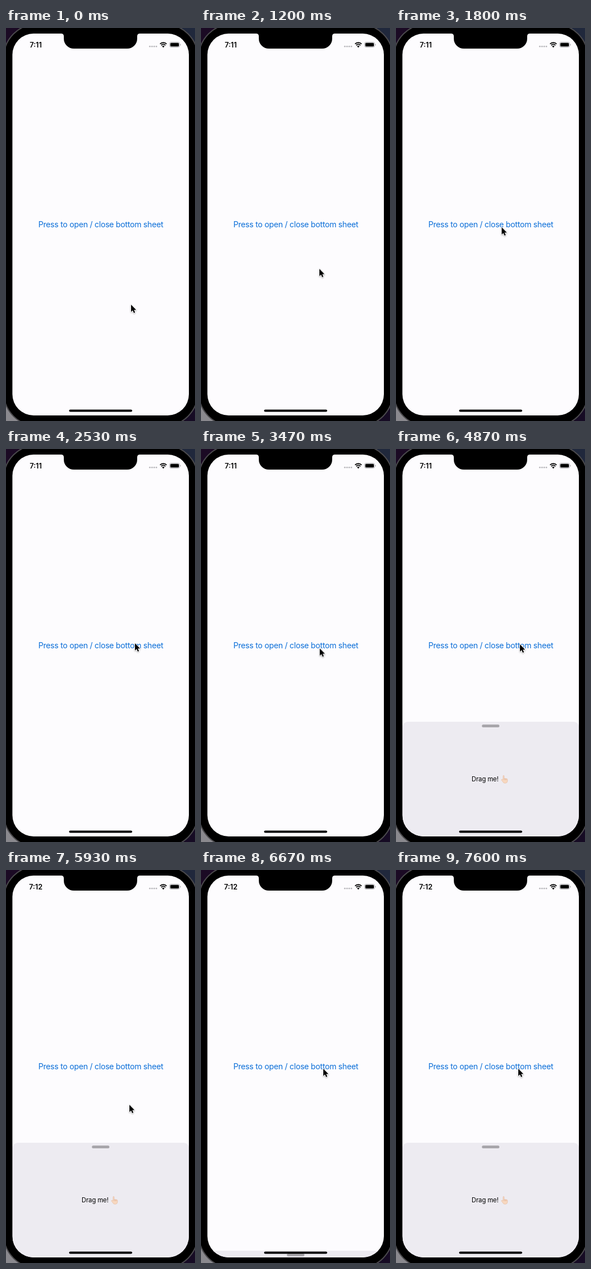
Animation, 340 px wide and 706 px high, one loop 8000 ms. Source, as an HTML page:

```html
<!DOCTYPE html>
<html lang="en">
<head>
<meta charset="utf-8">
<title>Bottom sheet</title>
<style>
  html, body { margin: 0; width: 100%; height: 100%; overflow: hidden; background: #000; }
  svg { display: block; width: 100vw; height: 100vh; }
  text { font-family: Inter, "Liberation Sans", sans-serif; }

  .link { font-size: 14.2px; letter-spacing: -.26px; fill: #0a6ed8; text-anchor: middle; }
  .label { font-size: 11.4px; letter-spacing: -.08px; }
  .clock { font-size: 12.7px; font-weight: 600; text-anchor: middle; }

  .link, .sheet, .cursor, .clock { animation: 8s linear infinite; }
  .link { animation-name: press; }
  .sheet { animation-name: slide; }
  .cursor { animation-name: point; }
  .before { animation-name: before; animation-timing-function: step-end; }
  .after { animation-name: after; animation-timing-function: step-end; }

  /* Critically damped spring, sampled evenly over 400 ms */
  :root {
    --spring: linear(0, .09, .264, .442, .594, .713, .801, .864, .908,
      .939, .96, .973, .983, .989, .993, .995, 1);
  }

  @keyframes slide {
    0% { transform: translateY(218px); }
    51.69% { transform: translateY(218px); animation-timing-function: var(--spring); }
    56.69% { transform: none; }
    80.35% { transform: none; animation-timing-function: var(--spring); }
    85.35% { transform: translateY(218px); }
    87.31% { transform: translateY(218px); animation-timing-function: var(--spring); }
    92.31%, 100% { transform: none; }
  }

  @keyframes press {
    0%, 50% { opacity: 1; }
    51.5% { opacity: .2; }
    52.3% { opacity: .2; animation-timing-function: ease-in-out; }
    55.44%, 78.75% { opacity: 1; }
    80.35% { opacity: .2; animation-timing-function: ease-in-out; }
    83.4%, 85.9% { opacity: 1; }
    87.31% { opacity: .2; animation-timing-function: ease-in-out; }
    90.44%, 100% { opacity: 1; }
  }

  @keyframes point {
    0%, .8% { transform: translate(225px, 497px); animation-timing-function: ease-in-out; }
    5.4% { transform: translate(168px, 352px); animation-timing-function: ease-in-out; }
    11.9% { transform: translate(215px, 495px); animation-timing-function: ease-in; }
    15% { transform: translate(213px, 433px); animation-timing-function: ease-out; }
    20% { transform: translate(185px, 355px); }
    22.5% { transform: translate(190px, 358px); animation-timing-function: ease-out; }
    29.1% { transform: translate(232px, 350px); }
    31.6%, 34.1% { transform: translate(232px, 349px); animation-timing-function: ease-in-out; }
    38.8% { transform: translate(205px, 360px); }
    44.1% { transform: translate(215px, 358px); }
    47.5%, 50% { transform: translate(222px, 352px); }
    54.1%, 60.9% { transform: translate(223px, 351px); animation-timing-function: ease-in-out; }
    64.1%, 70.9% { transform: translate(225px, 440px); animation-timing-function: ease-in; }
    74.1% { transform: translate(222px, 423px); animation-timing-function: ease-out; }
    77.5%, 100% { transform: translate(220px, 357px); }
  }

  @keyframes before {
    0% { visibility: visible; }
    67.5%, 100% { visibility: hidden; }
  }
  @keyframes after {
    0% { visibility: hidden; }
    67.5%, 100% { visibility: visible; }
  }
</style>
</head>
<body>
<svg viewBox="0 0 340 706">
  <defs>
    <clipPath id="screen"><rect x="11.5" y="10" width="317.5" height="686" rx="38"/></clipPath>
    <filter id="shadow" x="-50%" y="-50%" width="200%" height="200%">
      <feDropShadow dx="0" dy="1" stdDeviation="1" flood-opacity=".35"/>
    </filter>
  </defs>

  <!-- Desktop corners -->
  <rect width="170" height="353" fill="#1b0a24"/>
  <rect x="170" width="170" height="353" fill="#20283c"/>
  <rect y="353" width="170" height="353" fill="#8a898e"/>
  <rect x="170" y="353" width="170" height="353" fill="#160b24"/>

  <!-- Phone -->
  <rect x="-4" y="-7" width="349" height="722" rx="60" fill="#000" stroke="#4b4a4d" stroke-width="2"/>
  <g clip-path="url(#screen)">
    <rect width="340" height="706" fill="#fdfcfe"/>
    <text class="link" x="170.5" y="358">Press to open / close bottom sheet</text>

    <g class="sheet">
      <rect x="12" y="490" width="317" height="450" rx="9" fill="#edebf1"/>
      <rect x="154.5" y="495" width="31.5" height="5" rx="2.5" fill="#a8a6ab"/>
      <text class="label" x="136" y="597.2">Drag me!</text>
      <g transform="translate(189 586)">
        <path d="M3.6 8.3V1.6Q3.6.4 4.6.4T5.6 1.6V6Q6.6 5.2 7.5 6Q8.5 5.3 9.3 6.3Q11.5 5.8 11.6 7.8V10.5Q11.3 13.8 8.6 14.2H5.8Q4.2 13.8 3.2 12L.7 8.7Q.4 7.4 1.7 7.3Q2.7 7.3 3.6 8.3Z"
          fill="#f7d8c0" stroke="#dfae90" stroke-width=".5"/>
        <path d="M5.6 6V8.6M7.5 6V8.7M9.3 6.3V8.8" fill="none" stroke="#cf9b7c" stroke-width=".5"/>
      </g>
    </g>
  </g>
  <path d="M99 10Q104 10 104 15V19A18 18 0 0 0 122 37H218A18 18 0 0 0 236 19V15Q236 10 241 10V9H99Z"/>
  <rect x="113.5" y="685.4" width="113.5" height="4.2" rx="2.1"/>

  <!-- Status bar -->
  <text class="clock before" x="53.5" y="34.6">7:11</text>
  <text class="clock after" x="53.5" y="34.6">7:12</text>
  <g fill="#b8b7bb">
    <circle cx="258.8" cy="33.2" r="1.4"/>
    <circle cx="262.7" cy="33.2" r="1.4"/>
    <circle cx="266.6" cy="33.2" r="1.4"/>
    <circle cx="270.5" cy="33.2" r="1.4"/>
  </g>
  <g fill="none" stroke="#000" stroke-width="1.8">
    <path d="M277.1 28.6A8.6 8.6 0 0 1 288.9 28.6"/>
    <path d="M279.2 31A5.4 5.4 0 0 1 286.8 31"/>
  </g>
  <path d="M283 35.2L280.9 32.9A3 3 0 0 1 285.1 32.9Z"/>
  <rect x="294.3" y="25.5" width="18" height="9" rx="2.7" fill="none" stroke="#a9a8ac" stroke-width=".9"/>
  <rect x="295.6" y="26.8" width="15.4" height="6.4" rx="1.5"/>
  <path d="M313.3 28.5Q314.6 29 314.6 30T313.3 31.5Z" fill="#a9a8ac"/>

  <g class="cursor">
    <path d="M0 0V13L3 10.3L5 15L7.2 14L5.2 9.6H9.3Z" stroke="#fff" stroke-width="1.6"
      stroke-linejoin="round" paint-order="stroke" filter="url(#shadow)"/>
  </g>
</svg>
</body>
</html>
```
